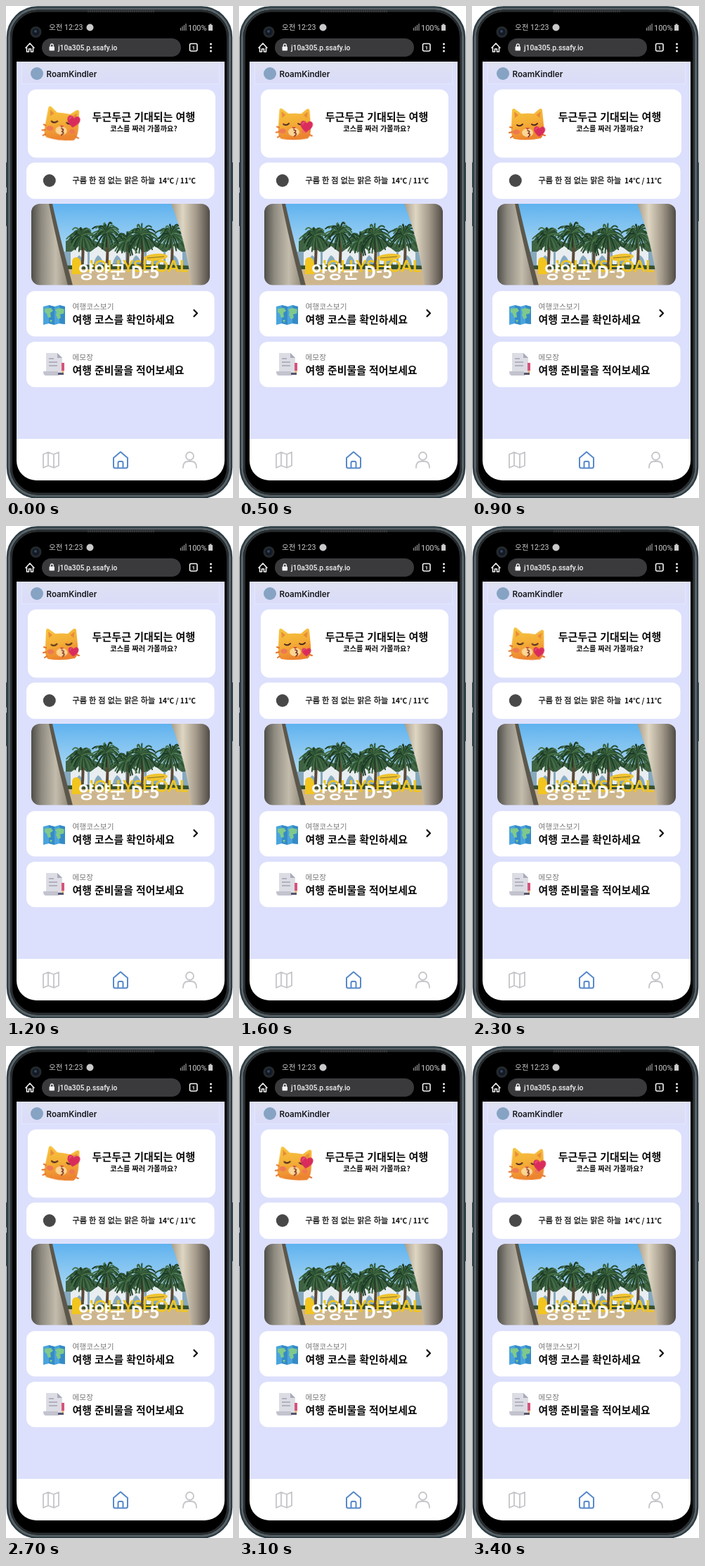
Recreate the animation shown at these times as an HTML page. Size 323 by 699 pixels, loop 3.5 s.

```html
<!DOCTYPE html>
<html lang="ko">
<head>
<meta charset="utf-8">
<title>Trip home screen</title>
<style>
html, body { margin: 0; width: 100%; height: 100%; overflow: hidden; background: #fff; }
svg { display: block; width: 323px; height: 699px; }
text { font-family: "Noto Sans CJK KR", "Noto Sans CJK", "Noto Sans", sans-serif; }
.ui { font-family: Roboto, "Noto Sans CJK KR", sans-serif; }
.bold { font-weight: 700; fill: #0b0b0d; }
.label { font-size: 10.7px; fill: #77777b; }
.line { fill: none; stroke-linecap: round; stroke-linejoin: round; }

.cat, .heart, .face { animation: 3.5s linear infinite; }
.cat { animation-name: lean; transform-origin: 79px 174px; }
.face { animation-name: nod; }
.heart { animation-name: kiss; }

/* A three second cycle, cut back to its start after 3.5 seconds. */
@keyframes lean {
  0% { transform: rotate(8deg) scale(1.03); }
  14.29% { transform: rotate(1deg); }
  25.71%, 45.71% { transform: rotate(0deg); }
  65.71% { transform: rotate(5deg); }
  77.14% { transform: rotate(9deg) scale(1.03); }
  85.71% { transform: rotate(8deg) scale(1.03); }
  100% { transform: rotate(1deg); }
}
@keyframes nod {
  0% { transform: translate(0, -2px); }
  14.29% { transform: translate(-1px, 0); }
  25.71% { transform: translate(0, 1px); }
  45.71% { transform: translate(1px, 0); }
  65.71% { transform: translate(0, 0); }
  77.14%, 85.71% { transform: translate(0, -2px); }
  100% { transform: translate(-1px, 0); }
}
@keyframes kiss {
  0% { transform: translate(96px, 164px) rotate(10deg) scale(1.12); }
  14.29% { transform: translate(96px, 171px) rotate(6deg) scale(1.08); }
  25.71% { transform: translate(96px, 178px) rotate(4deg) scale(.98); }
  45.71% { transform: translate(96px, 179px) rotate(0deg) scale(.8); }
  65.71% { transform: translate(95px, 179px) rotate(4deg) scale(.95); }
  77.14% { transform: translate(96px, 163px) rotate(10deg) scale(1.1); }
  85.71% { transform: translate(96px, 164px) rotate(10deg) scale(1.12); }
  100% { transform: translate(96px, 171px) rotate(6deg) scale(1.08); }
}
</style>
</head>
<body>
<svg viewBox="0 0 323 699" xmlns="http://www.w3.org/2000/svg">
  <defs>
    <linearGradient id="sky" x2="0" y2="1">
      <stop stop-color="#5fb2ef"/><stop offset=".6" stop-color="#b0daf3"/>
    </linearGradient>
    <linearGradient id="wall">
      <stop stop-color="#4e4d48"/><stop offset=".25" stop-color="#8f8b81"/>
      <stop offset=".6" stop-color="#c3bcac"/><stop offset="1" stop-color="#857c6c"/>
    </linearGradient>
    <linearGradient id="post">
      <stop stop-color="#a79d8a"/><stop offset=".3" stop-color="#ded5c2"/>
      <stop offset=".65" stop-color="#a3998a"/><stop offset="1" stop-color="#4f4b45"/>
    </linearGradient>
    <linearGradient id="fur" x2=".3" y2="1">
      <stop stop-color="#f6c63f"/><stop offset=".55" stop-color="#f4ae37"/><stop offset="1" stop-color="#ec842f"/>
    </linearGradient>
    <linearGradient id="head" x2="0" y2="1">
      <stop stop-color="#dfe1f3"/><stop offset="1" stop-color="#dadcf9"/>
    </linearGradient>
    <clipPath id="photo"><rect x="36" y="281" width="254" height="115.500" rx="12"/></clipPath>
  </defs>

  <!-- phone -->
  <g fill="#45565f">
    <rect y="222" width="4" height="36" rx="1"/><rect x="0" y="265" width="4" height="48" rx="1"/>
    <rect x="319" y="222" width="4" height="84" rx="1"/>
  </g>
  <rect x="2" y="1.500" width="319" height="697" rx="43" fill="#000" stroke="#2b3b43" stroke-width="2.500"/>
  <g fill="none" stroke-width="3">
    <rect x="4.500" y="4" width="314" height="692" rx="40.500" stroke="#596368"/>
    <rect x="7.500" y="7" width="308" height="686" rx="37.500" stroke="#282d30"/>
  </g>
  <path d="M116 7H211" stroke="#36383b" stroke-width="4" stroke-dasharray="2 1"/>
  <path d="M15 79V43a28 28 0 0 1 28-28H283a28 28 0 0 1 28 28V79Z"/>
  <circle cx="42.500" cy="37" r="8" fill="#25292d"/>
  <circle cx="42.500" cy="37" r="5" fill="#121a26"/><circle cx="42" cy="36" r="2" fill="#34475d"/>

  <!-- status bar -->
  <g class="ui" fill="#c9c9cb">
    <text class="ui" x="61" y="34" font-size="10.600">오전 12:23</text>
    <circle cx="119.500" cy="30.500" r="5"/>
    <path d="M248.500 31v4M251 29v6M253.500 27v8M256 25v10" stroke="#8d8d90" stroke-width="1.300"/>
    <text class="ui" x="259" y="34.500" font-size="11">100%</text>
    <path d="M288 27h1.500v-1.500h3V27H294v8h-6Z"/>
  </g>

  <!-- address bar -->
  <rect x="51" y="46" width="198" height="26" rx="13" fill="#3a3a3d"/>
  <g class="line" stroke="#f2f2f3" stroke-width="1.600">
    <path d="M28 59.500L34 53l6 6.500M29.500 58.500V65h3v-4h3v4h3v-6.500"/>
    <rect x="261.500" y="53.500" width="10.500" height="10.500" rx="2"/>
    <path d="M63.300 58v-2a2 2 0 0 1 4 0v2" stroke-width="1.300"/>
  </g>
  <g fill="#f2f2f3">
    <rect x="61.500" y="57.500" width="7.500" height="6" rx="1"/>
    <text class="ui" x="74" y="62.500" font-size="10.300" font-weight="500">j10a305.p.ssafy.io</text>
    <text class="ui" x="266.800" y="61.800" font-size="8" font-weight="700" text-anchor="middle">1</text>
    <circle cx="291.500" cy="54" r="1.500"/><circle cx="291.500" cy="59" r="1.500"/><circle cx="291.500" cy="64" r="1.500"/>
  </g>

  <!-- page -->
  <path d="M15 79H311V616H15Z" fill="#dce0fc"/>
  <rect x="22.500" y="79.500" width="281" height="31" fill="url(#head)" stroke="#e5e7fa"/>
  <circle cx="44" cy="96" r="9" fill="#86a3c4"/>
  <text x="57.500" y="100.500" font-size="11.600" font-weight="600" fill="#17181d" style="font-family:Inter,sans-serif">RoamKindler</text>

  <g fill="#fff">
    <rect x="31" y="118.500" width="267" height="97" rx="12"/>
    <rect x="29" y="222.500" width="267.500" height="51.500" rx="12"/>
    <rect x="29" y="405" width="267.500" height="64.500" rx="12"/>
    <rect x="29" y="477" width="267.500" height="64.500" rx="12"/>
    <path d="M15 615H311V646a28 28 0 0 1-28 28H43a28 28 0 0 1-28-28Z"/>
  </g>

  <!-- greeting -->
  <g class="cat">
    <path d="M57 148Q58 144 62 147L70 153Q79 152 88 153L95 147Q99 144 100 148L102 169Q103 184 98 188Q79 192 60 189Q55 186 56 172Z" fill="url(#fur)"/>
    <path d="M60 150l6 5-5 4Z M97.500 150l-6 5 5 4Z" fill="#e98a3a"/>
    <path d="M57 173l-3-1M57 179l-4 1M58 185l-3 2M101 183l3 1" class="line" stroke="#e2702a" stroke-width="2"/>
    <g class="face">
      <ellipse cx="79" cy="179" rx="8" ry="6" fill="#fbd595"/>
      <ellipse cx="63" cy="178" rx="5" ry="3.500" fill="#ee7950"/>
      <ellipse cx="94" cy="178" rx="4" ry="3" fill="#ee7950"/>
      <path d="M64 168q4 3 8-1M85 167q4 3 8-1" class="line" stroke="#4d2a20" stroke-width="2"/>
      <path d="M76 172h6l-3 3Z" fill="#c9473f"/>
      <path d="M79 176q5 1 1 4q5 1 0 5" class="line" stroke="#7a3024" stroke-width="1.600"/>
    </g>
  </g>
  <g class="heart">
    <path d="M0 8C-5 4-9 1-8-4C-7-8-2-8 0-4C2-8 7-8 8-4C9 1 5 4 0 8Z" fill="#d92c5c"/>
    <path d="M-5.500-2q0-3 2.500-3" class="line" stroke="#e8527f" stroke-width="1.500"/>
  </g>
  <text class="bold" x="196" y="163" font-size="15" text-anchor="middle">두근두근 기대되는 여행</text>
  <text class="bold" x="196" y="178" font-size="10.200" text-anchor="middle">코스를 짜러 가볼까요?</text>

  <!-- weather -->
  <circle cx="61.800" cy="248" r="9" fill="#484848"/>
  <text x="94.500" y="252" font-size="11.100" fill="#18181b" stroke="#18181b" stroke-width=".3">구름 한 점 없는 맑은 하늘</text>
  <text class="bold" x="217" y="252" font-size="10.200">14℃ / 11℃</text>

  <!-- destination -->
  <g clip-path="url(#photo)">
    <path d="M36 281H290V397H36Z" fill="url(#sky)"/>
    <path d="M85 334q20-10 42 0t42 0t42 0t46-2v20H85Z" fill="#3f6243"/>
    <path d="M80 349H270V372H80Z" fill="#86a9be"/>
    <g id="tents"></g>
    <path d="M80 369q90-5 185 0v6H80Z" fill="#36512f"/>
    <path d="M70 374H270V397H70Z" fill="#cdb68e"/>
    <g id="palms" class="line"></g>
    <path d="M36 281H65Q76 330 94 397H36Z" fill="url(#wall)"/>
    <path d="M61 281h5Q77 330 95 397h-7Q71 330 61 281Z" fill="#5c574c"/>
    <path d="M235 281H290V397H264Q255 330 235 281Z" fill="url(#post)"/>
    <path d="M94 381V363q1-7 7-6q6 2 6 11v13Z" fill="#f2c51f"/>
    <ellipse cx="213" cy="357" rx="17" ry="5" fill="#f0c431" transform="rotate(-5 213 357)"/>
    <path d="M201 358l24-2" stroke="#8b7427" stroke-width="1.200"/>
    <text x="115" y="377.500" font-size="23.500" font-weight="700" fill="#f0c51e" style="font-family:Lato,sans-serif">JOLLYSHOAL</text>
    <text x="103" y="387" font-size="24.500" font-weight="700" fill="#fff">양양군 D-5</text>
  </g>

  <!-- course card -->
  <g>
    <path d="M53 427l8-2 8 2 7-2 8 2v25l-8-1-7 2-8-2-8 2Z" fill="#4aa3dc"/>
    <path d="M61 425l8 2v26l-8-2ZM76 425l8 2v25l-8-1Z" fill="#358bc6"/>
    <path d="M55 430l9-1 3 4-4 3 1 6-4 1-2-6-3-2ZM70 431l6-2 7 2-1 6-5 1 1 5-4 2-3-6 1-4ZM62 446l4 0-2 4Z" fill="#80c98b"/>
  </g>
  <text class="label" x="94.500" y="430.500">여행코스보기</text>
  <text class="bold" x="94.500" y="451" font-size="14.900">여행 코스를 확인하세요</text>
  <path d="M267.500 432l4.500 4.500-4.500 4.500" class="line" stroke="#0b0b0d" stroke-width="2.200"/>

  <!-- memo card -->
  <g>
    <path d="M57 493h16l7 7v21q0 2-2 2H57Z" fill="#dcdce4"/>
    <path d="M73 493l7 7h-7Z" fill="#a9a9b9"/>
    <path d="M53 519h21v3q0 3 3 3H57q-4 0-4-6Z" fill="#c3c3cf"/>
    <path d="M61 501h7M61 506h12M61 511h12" stroke="#a3a3b3" stroke-width="1.500"/>
    <path d="M81 507v11" stroke="#d6537c" stroke-width="4"/>
    <path d="M79 518h4l-2 5Z" fill="#e9b07c"/>
    <path d="M74 521h8v3h-8Z" fill="#55556a"/>
  </g>
  <text class="label" x="94.500" y="502.500">메모장</text>
  <text class="bold" x="94.500" y="523" font-size="14.900">여행 준비물을 적어보세요</text>

  <!-- navigation -->
  <g class="line" stroke="#c5c5ca" stroke-width="1.800">
    <path d="M53 637l7-3 8 3 7-3v19l-7 3-8-3-7 3ZM60 634v19M68 637v19"/>
    <circle cx="261.500" cy="639.500" r="5.500"/>
    <path d="M252 656q0-9 7-9h5q7 0 7 9"/>
    <path d="M153 642l10-8.500 10 8.500v12q0 2.500-2.500 2.500h-15q-2.500 0-2.500-2.500ZM159.500 656v-7q0-2 2-2h3q2 0 2 2v7" stroke="#5688cb" stroke-width="2"/>
  </g>
</svg>
<script>
const byId = id => document.getElementById(id);

function addPath(group, d, attrs) {
  const path = document.createElementNS('http://www.w3.org/2000/svg', 'path');
  path.setAttribute('d', d);
  for (const key in attrs) path.setAttribute(key, attrs[key]);
  group.append(path);
}

for (let x = 92; x < 252; x += 27) {
  addPath(byId('tents'), `M${x} 350l12-9 12 9v22h-5q1-13-7-18q-6 5-7 18h-5Z`, { fill: '#e8edf0' });
}

let seed = 7;
const random = () => (seed = seed * 16807 % 2147483647) / 2147483647;
const greens = ['#1d3a25', '#2c5234', '#467046'];

function palm(x, y, size) {
  const group = byId('palms');
  addPath(group, `M${x} ${y}q3 24 0 ${372 - y}`, { stroke: '#5b4a38', 'stroke-width': 4 });
  for (let i = 0; i < 42; i++) {
    const angle = i / 42 * Math.PI * 2 + random() * .3;
    const reach = size * (.6 + random() * .5);
    const dx = Math.cos(angle) * reach, dy = Math.sin(angle) * reach * .8;
    addPath(group, `M${x} ${y}q${dx * .55} ${dy * .7 - 6} ${dx} ${dy + 6}`,
      { stroke: greens[i % 3], 'stroke-width': 2 });
  }
}

[[108, 326, 21], [172, 333, 19], [143, 322, 23], [193, 325, 24], [235, 325, 24]]
  .forEach(spot => palm(...spot));
</script>
</body>
</html>
```
